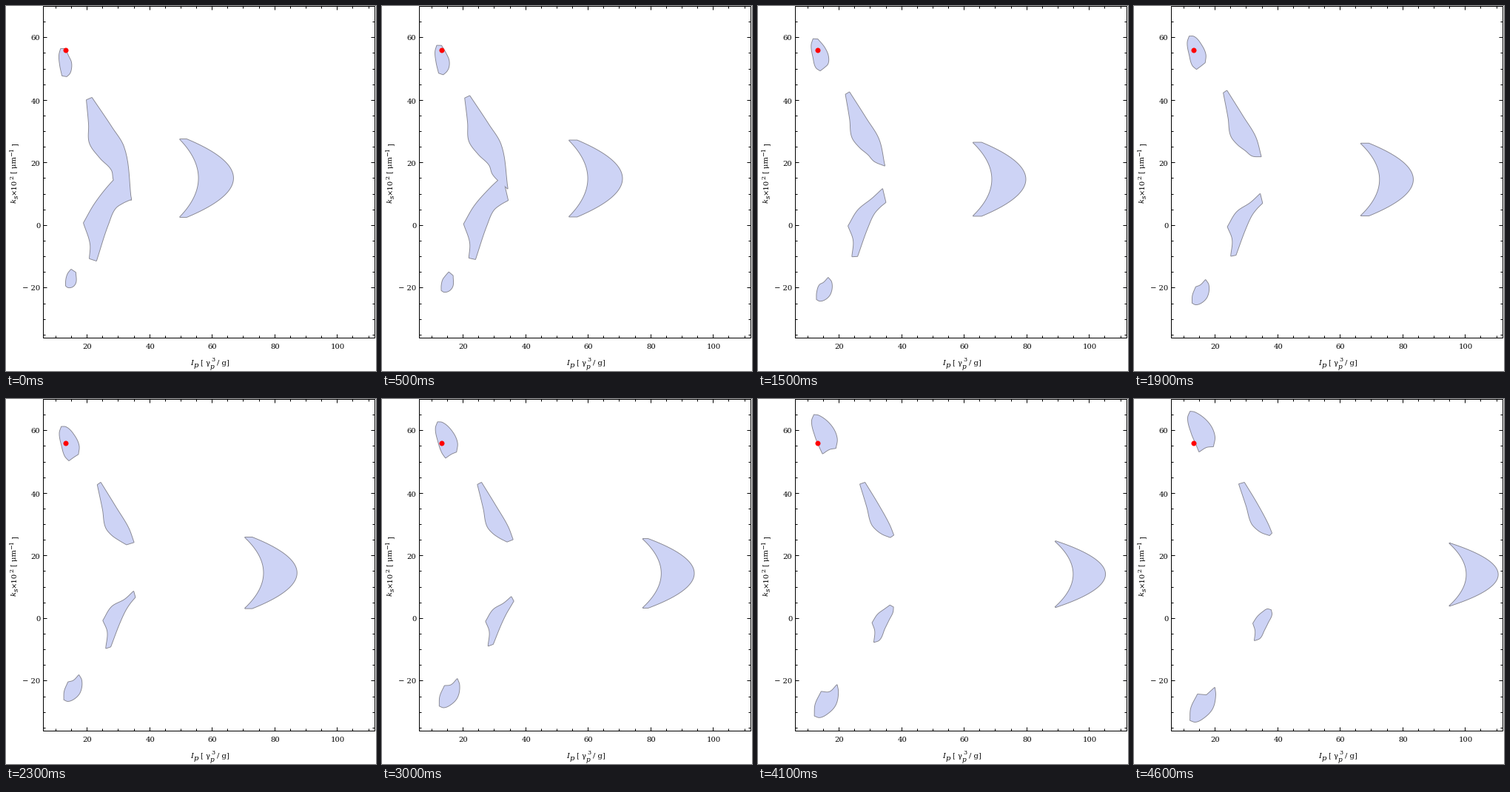
Animation of 500x493 px, one loop 4.7 s. Source, as a matplotlib script:

```python
import numpy as np
import matplotlib.pyplot as plt
from matplotlib.animation import FuncAnimation
from matplotlib.collections import LineCollection
from matplotlib.patches import Circle, Polygon, Rectangle

W, H, DPI = 500, 493, 64
FRAMES, STEP = 47, 100
PX = 72 / DPI
LEFT, TOP, SIDE = 50.5, 0.5, 448
RIGHT, BOTTOM = LEFT + SIDE, TOP + SIDE
SCALE = SIDE / 106
FILL, EDGE = "#cdd3f5", "#85858f"

plt.rcParams.update({"path.snap": False, "font.family": "DejaVu Serif"})
fig = plt.figure(figsize=(W / DPI, H / DPI), dpi=DPI, facecolor="white")
ax = fig.add_axes([0, 0, 1, 1])
ax.set(xlim=(0, W), ylim=(H, 0))
ax.axis("off")


def to_x(v):
    return LEFT + (v - 6) * SCALE


def to_y(v):
    return TOP + (70 - v) * SCALE


def label(x, y, text, size=10, **kw):
    ax.text(x, y, text, fontsize=size * PX, **kw)


def draw_axes():
    ticks = []
    for v in range(-35, 111, 5):
        major = v % 20 == 0
        n = 5 if major else 3
        if v >= 10:
            x = np.floor(to_x(v)) + 0.5
            ticks += [[(x, BOTTOM), (x, BOTTOM - n)], [(x, TOP), (x, TOP + n)]]
            if major:
                label(x + 0.5, 463, str(v), ha="center")
        if v < 70:
            y = np.floor(to_y(v)) + 0.5
            ticks += [[(LEFT, y), (LEFT + n, y)], [(RIGHT, y), (RIGHT - n, y)]]
            if major:
                text = str(v) if v >= 0 else f"\u2212 {-v}"
                label(46.5, y + 4, text, ha="right")
    ax.add_collection(LineCollection(ticks, colors="black", linewidths=PX, zorder=4))
    ax.add_patch(Rectangle((LEFT, TOP), SIDE, SIDE, fill=False, lw=PX, ec="black",
                           zorder=4))


def draw_titles():
    base = 485
    label(249, base, "I", style="italic")
    label(254, base + 3, "p", style="italic")
    label(263, base, "[ γ")
    label(276, base + 5, "p", 9, style="italic")
    label(277, base - 5, "3", 8)
    label(285, base, "/ g]")

    base, up = 14, dict(rotation=90, rotation_mode="anchor")
    label(base, 266, "k", style="italic", **up)
    label(base + 3, 260, "s", 9, style="italic", **up)
    label(base, 255, "×10", **up)
    label(base - 4, 234, "2", 8, **up)
    label(base, 226, "[ μm", **up)
    label(base - 4, 203, "\u22121", 8, **up)
    label(base, 189, "]", **up)


def smooth(p):
    """Closed curve through p that keeps its sharp corners."""
    seg = np.roll(p, -1, 0) - p
    size = np.hypot(*seg.T)[:, None]
    after = seg / size
    before = np.roll(after, 1, 0)
    mean = after + before
    soft = (after * before).sum(1, keepdims=True) > 0.7
    mean /= np.maximum(np.hypot(*mean.T)[:, None], 1e-6)
    m0 = np.where(soft, mean, after) * size
    m1 = np.roll(np.where(soft, mean, before), -1, 0) * size
    t = np.linspace(0, 1, 10, endpoint=False)[:, None, None]
    ease = t * t * (3 - 2 * t)
    curve = p + ease * seg + t * (1 - t) * ((1 - t) * m0 - t * m1)
    return curve.transpose(1, 0, 2).reshape(-1, 2)


def morph(*poses):
    """Motion through poses given at (frame, points) with straight steps between."""
    frames = [f for f, _ in poses]
    shapes = np.array([pts for _, pts in poses], float)

    def at(i):
        k = min(np.searchsorted(frames, i, "right"), len(frames) - 1)
        f = (i - frames[k - 1]) / (frames[k] - frames[k - 1])
        return smooth((1 - f) * shapes[k - 1] + f * shapes[k])
    return at


def crescent(i):
    """Space between two parabolas drifting to the right."""
    outer = 307 + 3.45 * i + 0.0123 * i * i
    gap = 46.5 - 0.09 * i
    bend = 0.0228 + 6.5e-6 * i * i
    hollow = 0.0092 + 8e-5 * i
    reach = min(np.sqrt(gap / (bend - hollow)), 52.5 - 0.2 * i)
    y = np.linspace(-reach, reach, 60)
    x = np.r_[outer - bend * y**2, (outer - gap - hollow * y**2)[::-1]]
    return np.c_[x, 232.5 + 0.1 * i + np.r_[y, y[::-1]]]


top = morph(
    (0, [(74, 58), (80, 58), (84, 67), (88, 76), (88, 85), (86, 91), (82, 95), (76, 94),
         (73, 80), (72, 66)]),
    (46, [(76, 17), (82, 18), (102, 34), (109, 51), (107, 64), (98, 65), (88, 71),
          (84, 61), (78, 47), (73, 25)]))
upper = morph(
    (0, [(109, 127), (116, 124), (143, 164), (159, 190), (169, 262), (146, 236),
         (143, 222), (127, 205), (113, 185), (112, 160)]),
    (22, [(123, 116), (127, 113), (148, 147), (165, 175), (172, 194), (162, 197),
          (152, 191), (142, 184), (134, 174), (130, 150)]),
    (46, [(142, 115), (149, 113), (166, 141), (181, 169), (186, 181), (183, 184),
          (172, 180), (164, 174), (159, 168), (152, 145)]))
lower = morph(
    (0, [(160, 222), (169, 261), (158, 266), (148, 273), (138, 295), (122, 344),
         (113, 341), (114, 322), (105, 293), (120, 267), (143, 238)]),
    (22, [(172, 259), (174, 267), (167, 275), (161, 284), (153, 301), (140, 335),
          (134, 337), (136, 314), (130, 299), (142, 280), (160, 270)]),
    (46, [(180, 284), (185, 285), (186, 291), (181, 302), (176, 312), (170, 323),
          (163, 326), (164, 313), (161, 303), (167, 294), (175, 287)]))
bottom = morph(
    (0, [(88, 356), (94, 360), (94, 374), (90, 379), (84, 380), (81, 378), (81, 372),
         (82, 366), (84, 361)]),
    (46, [(109, 390), (110, 400), (106, 418), (95, 430), (83, 436), (76, 434), (77, 418),
          (86, 399), (98, 400)]))

# Fills lie above all strokes, so overlapping regions read as one.
paths = [top, upper, lower, bottom, crescent]
strokes = [ax.add_patch(Polygon(p(0), fill=False, ec=EDGE, lw=1.8 * PX, zorder=1,
                                joinstyle="round")) for p in paths]
fills = [ax.add_patch(Polygon(p(0), fc=FILL, ec="none", zorder=2)) for p in paths]

draw_axes()
draw_titles()
ax.add_patch(Circle((81, 60), 3.5, fc="red", ec="none", zorder=3))


def update(i):
    for path, stroke, fill in zip(paths, strokes, fills):
        # The bottom region drops out briefly.
        seen = path is not bottom or abs(i - 10) > 2
        for patch in (stroke, fill):
            patch.set_xy(path(i))
            patch.set_visible(seen)
    return strokes + fills


anim = FuncAnimation(fig, update, frames=FRAMES, interval=STEP, repeat=True,
                     repeat_delay=0, blit=False)
plt.show()
```
